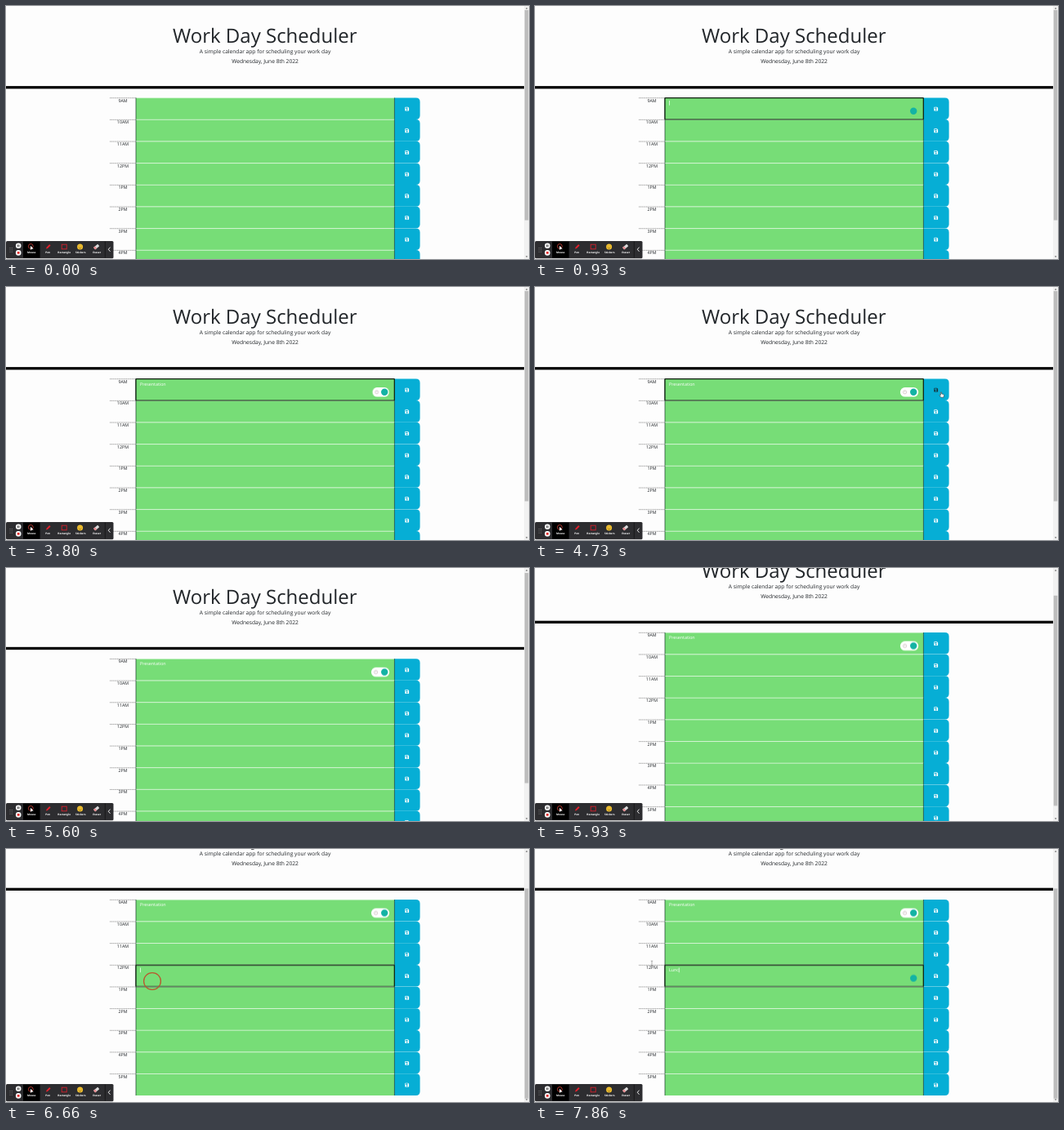
These frames come from a looping animation (640 by 310 pixels, 8 s). An HTML page:

```html
<!DOCTYPE html>
<html lang="en">
<head>
<meta charset="utf-8">
<title>Work Day Scheduler</title>
<style>
  html, body { margin: 0; width: 100%; height: 100%; overflow: hidden; background: #fdfdfd; }
  svg { display: block; width: 100%; height: 100%; }
  text { font-family: "Open Sans", sans-serif; text-rendering: geometricPrecision; fill: #212529; }
  .mid { text-anchor: middle; }
  .lead { font-size: 6.67px; }
  .small { font-size: 5.33px; }
  .note { fill: #fff; }
  .label { font-size: 3.2px; font-weight: 700; fill: #fff; }

  /* One loop is 8 s, so 1% is 80 ms */
  .anim { animation: 8s linear infinite; }
  .cut { animation: 8s step-end infinite; }
  #page { animation-name: scroll; }
  #thumb { animation-name: thumb; }
  #pointer { animation-name: move; animation-timing-function: ease-in-out; }
  #arrow { animation-name: arrow; }
  #hand { animation-name: hand; }
  #beam { animation-name: beam; }
  #ring { animation-name: ring; }
  #focus0 { animation-name: focus0; }
  #focus3 { animation-name: focus3; }
  #badge0 { animation-name: badge0; }
  #badge3 { animation-name: badge3; }
  #pill { animation-name: pill; transform-origin: 463px 0; }
  #save0 { animation-name: hover; }

  @keyframes scroll {
    0%, 69.6% { transform: translateY(0); animation-timing-function: ease-in-out; }
    72.6%, 75% { transform: translateY(-33.4px); animation-timing-function: ease-in-out; }
    77%, 100% { transform: translateY(-50.4px); }
  }
  @keyframes thumb {
    0%, 69.6% { transform: translateY(0); animation-timing-function: ease-in-out; }
    72.6%, 75% { transform: translateY(28.8px); animation-timing-function: ease-in-out; }
    77%, 100% { transform: translateY(43.4px); }
  }
  @keyframes move {
    0%, .7% { transform: translate(637px, 40px); }
    6.5%, 52.4% { transform: translate(300px, 127px); }
    56.5% { transform: translate(516px, 128px); }
    58.8%, 62.6% { transform: translate(497px, 129px); }
    66%, 77% { transform: translate(240px, 128px); }
    80%, 86% { transform: translate(179px, 162px); }
    90%, 100% { transform: translate(143px, 140px); }
  }
  @keyframes arrow { 0% { opacity: 0; } .7% { opacity: 1; } 5.2%, 100% { opacity: 0; } }
  @keyframes hand { 0% { opacity: 0; } 55.2% { opacity: 1; } 63.5%, 100% { opacity: 0; } }
  @keyframes beam { 0% { opacity: 0; } 88.4%, 100% { opacity: .75; } }
  @keyframes ring {
    0% { opacity: 0; } 7% { opacity: 1; } 9.2% { opacity: 0; }
    60% { opacity: 1; } 62.4% { opacity: 0; }
    83% { opacity: 1; } 85.8%, 100% { opacity: 0; }
  }
  @keyframes focus0 { 0% { opacity: 0; } 7% { opacity: 1; } 60%, 100% { opacity: 0; } }
  @keyframes focus3 { 0% { opacity: 0; } 83%, 100% { opacity: 1; } }
  @keyframes badge0 { 0% { opacity: 0; } 11%, 100% { opacity: 1; } }
  @keyframes badge3 { 0% { opacity: 0; } 86.6%, 100% { opacity: 1; } }
  @keyframes pill {
    0%, 44.1% { opacity: 0; transform: scaleX(.5); }
    45% { opacity: 1; transform: scaleX(.55); }
    48.2%, 100% { opacity: 1; transform: none; }
  }
  @keyframes hover { 0% { fill: #fff; } 55.2% { fill: #16333d; } 63.5%, 100% { fill: #fff; } }
</style>
</head>
<body>
<svg viewBox="0 0 640 310">
  <defs>
    <path id="disk" fill-rule="evenodd" d="M-2.4-1.9q0-.5.5-.5h3.2l1.1 1.1v3.2q0 .5-.5.5h-3.8q-.5 0-.5-.5z
      M-1.7-1.7v1.3h2.7v-1.3z M-.9 1a.9.9 0 1 0 1.8 0a.9.9 0 1 0-1.8 0z"/>
  </defs>

  <rect width="640" height="310" fill="#fdfdfd"/>

  <g id="page" class="anim">
    <text class="mid" x="316.8" y="45" font-size="24">Work Day Scheduler</text>
    <text class="mid lead" x="317" y="58.3">A simple calendar app for scheduling your work day</text>
    <text class="mid lead" x="317" y="70.4">Wednesday, June 8th 2022</text>
    <rect y="98.1" width="634" height="3.3"/>

    <g id="rows"></g>

    <g fill="none" stroke="#0c1c0c" stroke-width="1.1">
      <rect id="focus0" class="cut" x="158.9" y="112.6" width="316.4" height="26.4" rx=".7"/>
      <rect id="focus3" class="cut" x="158.9" y="192.6" width="316.4" height="26.4" rx=".7"/>
    </g>
    <text id="note0" class="small note" x="164" y="120.5"></text>
    <text id="note3" class="small note" x="164" y="200.5"></text>
    <rect id="caret" width=".7" height="5.8" fill="#fff"/>

    <g id="pill" class="anim">
      <rect x="446.9" y="123" width="22.3" height="11.6" rx="5.8" fill="#fff"/>
      <circle cx="452.6" cy="128.8" r="2.1" fill="none" stroke="#c9b9bb" stroke-width=".7"/>
      <path d="M452.6 127.7v1.3" stroke="#c9b9bb" stroke-width=".6"/>
    </g>
    <circle id="badge0" class="cut" cx="463.2" cy="128.8" r="4.2" fill="#14b3a4"/>
    <circle id="badge3" class="cut" cx="463.2" cy="208.8" r="4.2" fill="#14b3a4"/>
  </g>

  <rect x="634" width="6" height="310" fill="#f1f1f1"/>
  <path d="M635.8 3.4l1.3-1.5 1.3 1.5zM635.8 306.4l1.3 1.5 1.3-1.5z" fill="#505050"/>
  <rect id="thumb" class="anim" x="634.7" y="5" width="4.6" height="257.5" fill="#bdbdbd"/>

  <g id="tools">
    <rect y="288" width="131.5" height="21.2" rx="1.5" fill="#2d2d30"/>
    <rect x="21" y="288.6" width="20.6" height="20" fill="#000"/>
    <path d="M5 296v6M7.3 296v6" stroke="#8c8c8c" stroke-width=".9" stroke-dasharray=".9 1.5"/>
    <circle cx="15.2" cy="293.8" r="3.3" fill="#fff"/>
    <path d="M14.4 292.4v2.8M16 292.4v2.8" stroke="#222" stroke-width=".8"/>
    <circle cx="15.2" cy="302.4" r="3.3" fill="#fff"/>
    <rect x="13.8" y="301" width="2.8" height="2.8" rx=".4" fill="#e02a2a"/>
    <circle cx="30.3" cy="294.4" r="2.9" fill="none" stroke="#d8463c" stroke-width=".8"/>
    <path d="M30 293.7v5.2l1.3-1.2 2.3-.1z" fill="#fff"/>
    <path d="M49 297.6l.6-1.9 3.6-3.6 1.4 1.4-3.6 3.6z" fill="#e3202c"/>
    <rect x="68.2" y="292.2" width="6" height="5.6" fill="none" stroke="#d3202c" stroke-width=".9"/>
    <circle cx="90.6" cy="295" r="3.5" fill="#f7c531"/>
    <path d="M89.3 293.6v.9M91.9 293.6v.9M88.8 296q1.8 2 3.6 0" fill="none" stroke="#5d4212" stroke-width=".6"/>
    <g transform="rotate(-40 110.6 295)">
      <rect x="107.2" y="293.4" width="6.8" height="3.3" rx=".5" fill="#d9d9d9"/>
      <rect x="107.2" y="293.4" width="2.5" height="3.3" rx=".5" fill="#e98a8f"/>
    </g>
    <path d="M121.3 288.6v20" stroke="#111" stroke-width=".7"/>
    <path d="M127.5 295.6l-2.2 2.6 2.2 2.6" fill="none" stroke="#fff" stroke-width=".9"/>
  </g>

  <g id="pointer" class="anim">
    <circle id="ring" class="cut" r="10.4" fill="none" stroke="#b9582f" stroke-width="1.3"/>
    <path id="arrow" class="cut" d="M0 0v5.6l1.3-1.2.9 2 .8-.4-.9-1.9h1.8z" fill="#fff" stroke="#222" stroke-width=".5"/>
    <path id="hand" class="cut" d="M-.6 0q.6-.6 1.2 0v2l2.2.5q.8.3.7 1.1l-.5 2.6h-3.2l-2-2.6q.4-.8 1.6.1z"
      fill="#fff" stroke="#222" stroke-width=".5"/>
    <path id="beam" class="cut" d="M-1.2-2.8h2.4M0-2.8v5.6M-1.2 2.8h2.4" fill="none" stroke="#555" stroke-width=".6"/>
  </g>
</svg>
<script>
  const LOOP = 8000, TOP = 112.4, PITCH = 26.667, BLINK = 530;
  const $ = id => document.getElementById(id);

  const hours = ["9AM", "10AM", "11AM", "12PM", "1PM", "2PM", "3PM", "4PM", "5PM"];
  $("rows").innerHTML = hours.map((hour, i) => `
    <g transform="translate(0 ${TOP + i * PITCH})">
      <path d="M127 .3h32" stroke="#777" stroke-width=".7" stroke-dasharray="1.2 .6"/>
      <text class="mid small" x="143" y="5.2">${hour}</text>
      <rect x="159" width="316.3" height="${PITCH}" fill="#77dd77"/>
      <path d="M159 .2h316.3" stroke="#e3f8e3" stroke-width=".8"/>
      <path d="M475.3 0h26.3q5 0 5 5v16.6q0 5-5 5h-26.3z" fill="#06aed5"/>
      <path d="M159 0v${PITCH}M475.4 0v${PITCH}" stroke="#16382a" stroke-width=".7"/>
      <use id="save${i}" class="cut" href="#disk" x="490.7" y="13.7" fill="#fff"/>
    </g>`).join("");

  const labels = ["Mouse", "Pen", "Rectangle", "Stickers", "Eraser"];
  $("tools").insertAdjacentHTML("beforeend", labels.map((name, i) =>
    `<text class="mid label" x="${31.2 + i * 20}" y="303.4">${name}</text>`).join(""));

  // Each note: key press times, and the span in which its field has focus
  const notes = [
    { el: $("note0"), word: "Presentation", from: 560, to: 4800, y: 115.9,
      keys: [1460, 1600, 1730, 1930, 2000, 2200, 2400, 2600, 2660, 2860, 3000, 3060] },
    { el: $("note3"), word: "Lunc", from: 6640, to: LOOP, y: 195.9,
      keys: [7260, 7400, 7660, 7800] }
  ];
  const caret = $("caret");
  const clock = $("page").getAnimations()[0];

  function draw(now) {
    const t = (clock ? clock.currentTime || 0 : now) % LOOP;
    let shown = false;
    for (const { el, word, from, to, y, keys } of notes) {
      const count = keys.filter(k => k <= t).length;
      const str = word.slice(0, count);
      if (el.textContent !== str) el.textContent = str;
      if (t < from || t >= to) continue;
      const since = t - (count ? keys[count - 1] : from);
      shown = since % (2 * BLINK) < BLINK;
      caret.setAttribute("x", 164 + (count ? el.getComputedTextLength() : 0));
      caret.setAttribute("y", y);
    }
    caret.style.opacity = shown ? 1 : 0;
    requestAnimationFrame(draw);
  }
  requestAnimationFrame(draw);
</script>
</body>
</html>
```
